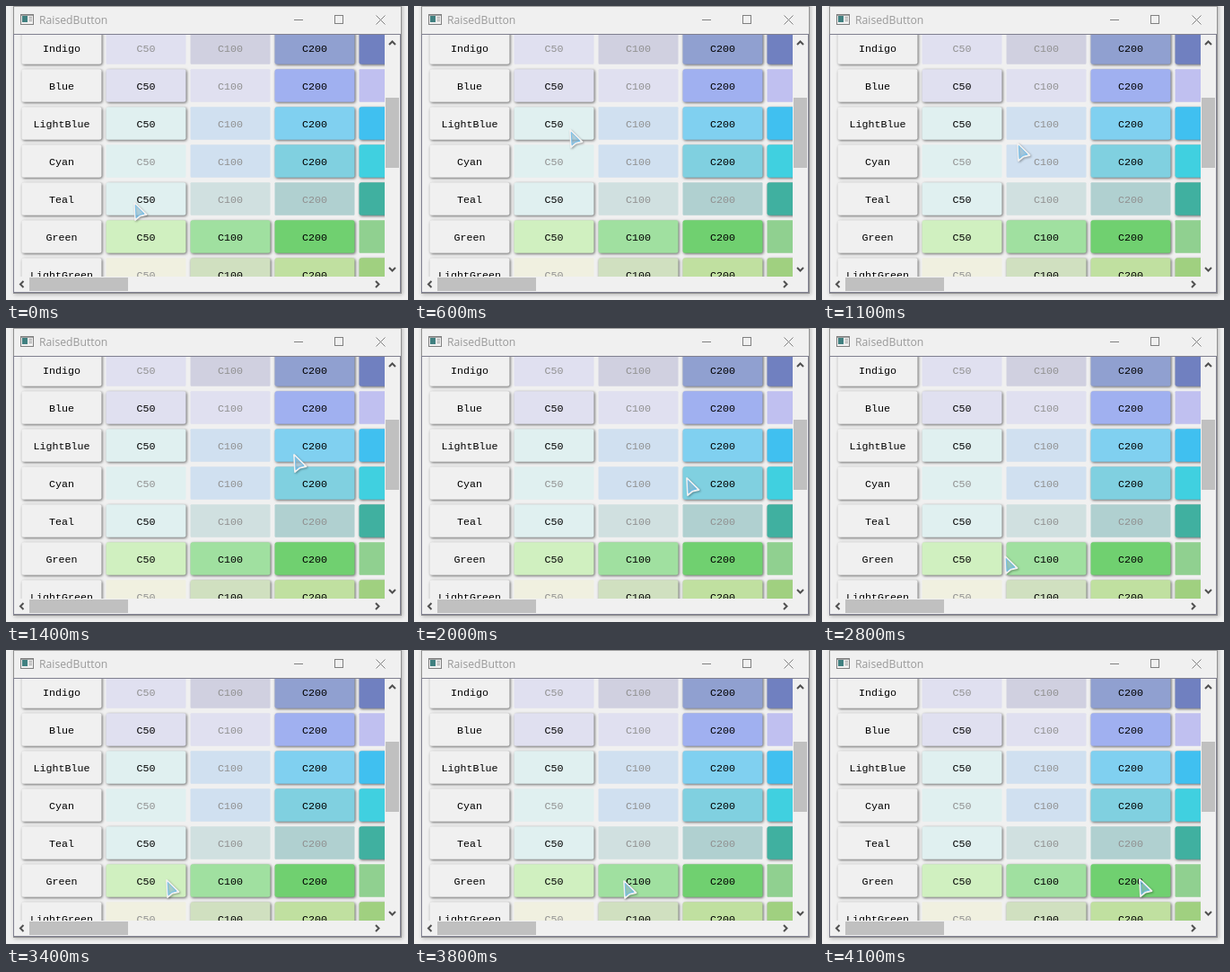
An HTML page that plays this animation: 448 by 327 pixels, repeating every 4400 ms.

```html
<!DOCTYPE html>
<html lang="en">
<head>
<meta charset="utf-8">
<title>RaisedButton</title>
<style>
  html, body { margin: 0; width: 100%; height: 100%; overflow: hidden; background: #f0f0f0; }
  svg { display: block; }
  .label { font-family: "Liberation Mono", monospace; text-anchor: middle; }
  .raised { filter: drop-shadow(1.2px 1.2px 1.5px rgba(0, 0, 0, .58)); }
  .raised.high { filter: drop-shadow(1.5px 3px 2.2px rgba(0, 0, 0, .6)); }
  .title { font: 12.2px "Open Sans", "Noto Sans", sans-serif; fill: #999; }
  .window { filter: drop-shadow(1px 1px 2px rgba(0, 0, 0, .25)); }
  .pointer { filter: drop-shadow(1px 1px .8px rgba(0, 0, 0, .35)); }
</style>
</head>
<body>
<svg width="448" height="327" viewBox="0 0 448 327">
  <defs>
    <clipPath id="view"><rect x="9" y="32" width="413" height="269"/></clipPath>
    <linearGradient id="ice" x1="0" y1="0" x2=".6" y2="1">
      <stop offset="0" stop-color="#e0f0f0" stop-opacity=".4"/>
      <stop offset="1" stop-color="#70c0f0" stop-opacity=".6"/>
    </linearGradient>
  </defs>

  <rect class="window" x="8.5" y="-4.5" width="432" height="324" fill="#f0f0f0" stroke="#909090"/>
  <path d="M8.5 .5H440.5" stroke="#a0a0a0"/>

  <!-- title bar -->
  <rect x="16.5" y="9.5" width="14" height="11" fill="#f0f0f0" stroke="#808080"/>
  <path d="M17 10.5H30" stroke="#a0a0a0"/>
  <rect x="18" y="11" width="6" height="7" fill="#408080"/>
  <path d="M25.5 12.5H29M25.5 14.5H29M25.5 16.5H29" stroke="#a0a0a0"/>
  <text class="title" x="37" y="20">RaisedButton</text>
  <g fill="none" stroke="#808080">
    <path d="M321 15.5H331"/>
    <rect x="366.5" y="10.5" width="9" height="9"/>
    <path d="M412.5 10.5L422.5 20.5M422.5 10.5L412.5 20.5"/>
  </g>

  <g id="grid" clip-path="url(#view)"></g>

  <!-- scroll area -->
  <rect x="8.5" y="31.5" width="431" height="287" fill="none" stroke="#808090"/>
  <rect x="423" y="102" width="15" height="78" fill="#c0c0c0"/>
  <rect x="26" y="302" width="110" height="15" fill="#c0c0c0"/>
  <g fill="none" stroke="#505050" stroke-width="2">
    <path d="M427 43L430.5 39.5L434 43"/>
    <path d="M427 291L430.5 294.5L434 291"/>
    <path d="M19.5 306L16 309.5L19.5 313"/>
    <path d="M412 306L415.5 309.5L412 313"/>
  </g>

  <g id="pointer" class="pointer" fill="none" stroke-linejoin="round">
    <path d="M1 1L2 20L7.5 15.5L14.5 14Z" fill="url(#ice)" stroke="#f0f0f0" stroke-width="1.8"/>
    <path d="M2.2 3.4L3.1 17.6L7 14.3L12 13.1Z" stroke="#70c0f0" stroke-width=".9"/>
  </g>
</svg>

<script>
const LOOP = 4400;
const SHADES = ['C50', 'C100', 'C200', 'C300'];

// A leading "-" marks a disabled button.
const ROWS = [
  ['Indigo', '-e0e0f0', '-d0d0e0', '90a0d0', '7080c0'],
  ['Blue', 'e0e0f0', '-e0e0f0', 'a0b0f0', '-c0c0f0'],
  ['LightBlue', 'e0f0f0', '-d0e0f0', '80d0f0', '40c0f0'],
  ['Cyan', '-e0f0f0', '-d0e0f0', '80d0e0', '40d0e0'],
  ['Teal', 'e0f0f0', '-d0e0e0', '-b0d0d0', '40b0a0'],
  ['Green', 'd0f0c0', 'a0e0a0', '70d070', '-90d090'],
  ['LightGreen', '-f0f0e0', 'd0e0c0', 'c0e0a0', 'a0d080']
];

// Pointer poses: time, x, y and the button lifted at that moment.
const POSES = [
  [0, 142, 218],
  [100, 149, 200, 'Teal C50'],
  [200, 158, 168],
  [300, 169, 137, 'LightBlue C50'],
  [600, 173, 137],
  [1000, 184, 142],
  [1100, 217, 152],
  [1200, 262, 161],
  [1300, 304, 162, 'Cyan C200'],
  [1400, 320, 140],
  [1800, 318, 143, 'LightBlue C200'],
  [1900, 311, 154, 'LightBlue C200'],
  [2000, 303, 166],
  [2400, 295, 177],
  [2500, 274, 201],
  [2600, 243, 230],
  [2700, 215, 249, 'Green C100'],
  [2800, 203, 253],
  [3200, 196, 254, 'Green C50'],
  [3300, 184, 255, 'Green C50'],
  [3400, 178, 255],
  [3700, 190, 256],
  [3800, 233, 256],
  [3900, 288, 255],
  [4000, 335, 254, 'Green C200'],
  [4100, 353, 254]
];

const grid = document.getElementById('grid');
const pointer = document.getElementById('pointer');
const buttons = {};

function add(tag, attrs, text) {
  const node = document.createElementNS('http://www.w3.org/2000/svg', tag);
  for (const key in attrs) node.setAttribute(key, attrs[key]);
  if (text) node.textContent = text;
  return grid.appendChild(node);
}

function addButton(row, col, label, color) {
  const x = 18 + col * 94, y = 28 + row * 42;
  const off = color[0] === '-';
  const rect = add('rect', {
    x: x - .5, y: y + .2, width: 89, height: 36.5, rx: off ? 1 : 2.5,
    fill: '#' + color.replace('-', ''), class: off ? 'flat' : 'raised'
  });
  add('text', { x: x + 44, y: y + 23, class: 'label', fill: off ? '#909090' : '#000' }, label);
  return rect;
}

ROWS.forEach(([name, ...colors], row) => {
  addButton(row, 0, name, 'f0f0f0');
  colors.forEach((color, i) => {
    buttons[name + ' ' + SHADES[i]] = addButton(row, i + 1, SHADES[i], color);
  });
});

// Pick the font size that gives a 7px character advance.
grid.setAttribute('font-size', 14);
const sample = [...grid.querySelectorAll('text')].find(t => t.textContent === 'LightBlue');
grid.setAttribute('font-size', 14 * 63 / sample.getComputedTextLength());

function draw(time) {
  const t = time % LOOP;
  const [, x, y, lifted] = POSES.filter(pose => pose[0] <= t).pop();
  pointer.setAttribute('transform', `translate(${x} ${y})`);
  for (const key in buttons) buttons[key].classList.toggle('high', key === lifted);
}

const start = performance.now();
function tick() {
  draw(performance.now() - start);
  requestAnimationFrame(tick);
}
tick();
</script>
</body>
</html>
```
